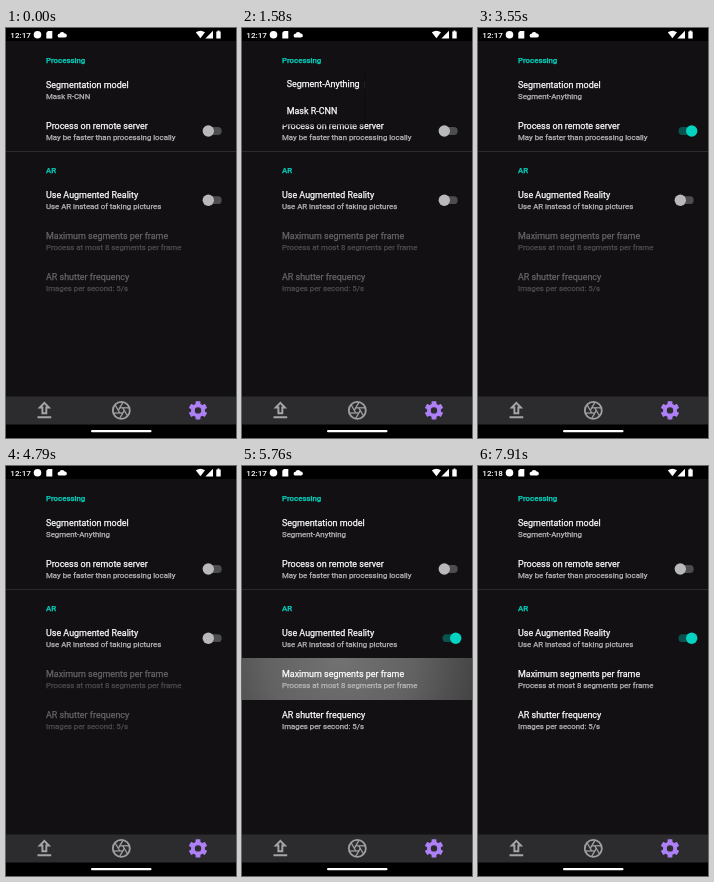
Recreate the animation shown at these times as an HTML page. Size 230 by 410 pixels, loop 8000 ms.

```html
<!DOCTYPE html>
<html lang="en">
<head>
<meta charset="utf-8">
<title>Settings</title>
<style>
html, body { margin: 0; width: 100%; height: 100%; overflow: hidden; background: #000; }
svg { display: block; width: 230px; height: 410px; font-family: Roboto, "Noto Sans", sans-serif; }
text { stroke-width: .25px; }
.head { font-size: 7.83px; font-weight: 500; fill: #04d1be; stroke: #04d1be; }
.title { font-size: 8.95px; fill: #fff; stroke: #fff; }
.sub { font-size: 7.83px; fill: #bababb; stroke: #bababb; }
</style>
</head>
<body>
<svg viewBox="0 0 230 410">
  <defs>
    <radialGradient id="glow" gradientUnits="userSpaceOnUse" cx="98" cy="0" r="135">
      <stop offset="0" stop-color="#727272"/>
      <stop offset=".55" stop-color="#626262"/>
      <stop offset="1" stop-color="#454545"/>
    </radialGradient>
  </defs>
  <rect width="230" height="410"/>
  <rect y="13" width="230" height="356" fill="#121013"/>

  <g fill="#fff">
    <text id="clock" x="4.3" y="9.8" font-size="8.1" font-weight="500"></text>
    <circle cx="31.5" cy="6.8" r="3.8"/>
    <path d="M42 3h4.3v7.6h-6V4.8z"/>
    <path d="M53.5 9.6a1.9 1.9 0 0 1 0-3.8 2.8 2.8 0 0 1 5.2-.2 2 2 0 0 1 .3 4z"/>
    <path d="M189.8 4.3q4.6-3 9.2 0l-4.6 6z"/>
    <path d="M207 2.8v7.6h-7.6z"/>
    <path d="M210.3 3.4h1.3v-.8h1.8v.8h1.3v7h-4.4z"/>
  </g>

  <rect id="ripple" width="230" height="42" fill="url(#glow)"/>
  <rect y="123" width="230" height="1" fill="#2b2a2c"/>
  <text class="head" x="40" y="35.3">Processing</text>
  <text class="head" x="40" y="145">AR</text>
  <g id="rows"></g>

  <rect y="368.5" width="230" height="28" fill="#2c2b2e"/>
  <path transform="translate(26.6 370.6) scale(.98)" fill="#a5a5a6" fill-rule="evenodd"
    d="M5 20h14v-2H5zM9 16h6v-6h4l-7-7-7 7h4zM11 14V8H9.8L12 5.8 14.2 8H13v6z"/>
  <g id="shutter" transform="translate(115.3 382.4)" fill="none" stroke="#a0a0a1" stroke-width="1.3">
    <circle r="8.5" stroke-width="1.8"/>
  </g>
  <g id="gear" transform="translate(192 382.4)" fill="#ae80f7">
    <circle r="5.1" fill="none" stroke="#ae80f7" stroke-width="3.8"/>
  </g>
  <rect x="85" y="402.1" width="60.5" height="2.2" rx="1.1" fill="#fff"/>
  <g id="menus"></g>
</svg>

<script>
const $ = id => document.getElementById(id);

function add(parent, tag, attrs, text = '') {
  const el = document.createElementNS('http://www.w3.org/2000/svg', tag);
  for (const key in attrs) el.setAttribute(key, attrs[key]);
  el.textContent = text;
  return parent.appendChild(el);
}

// Progress from 0 to 1 between two times
const ramp = (t, a, b) => Math.min(1, Math.max(0, (t - a) / (b - a)));
const ease = p => p * p * (3 - 2 * p);
// Rises over a..b, falls over c..d
const pulse = (t, a, b, c, d) => ramp(t, a, b) * (1 - ramp(t, c, d));
const mix = (from, to, p) =>
  `rgb(${from.map((v, i) => Math.round(v + (to[i] - v) * p))})`;

for (let a = 0; a < 360; a += 60) {
  add($('shutter'), 'path', { d: 'M-1.5 -2.6H8', transform: `rotate(${a})` });
  add($('gear'), 'rect', { x: -2.4, y: -9.2, width: 4.8, height: 3.6, rx: .6, transform: `rotate(${a})` });
}

const rows = [
  [60.2, 'Segmentation model', 'Mask R-CNN'],
  [101, 'Process on remote server', 'May be faster than processing locally'],
  [170.2, 'Use Augmented Reality', 'Use AR instead of taking pictures'],
  [211, 'Maximum segments per frame', 'Process at most 8 segments per frame'],
  [251.7, 'AR shutter frequency', 'Images per second: 5/s']
].map(([y, title, sub]) => {
  const g = add($('rows'), 'g', {});
  add(g, 'text', { class: 'title', x: 40, y }, title);
  return { g, y, sub: add(g, 'text', { class: 'sub', x: 40, y: y + 11 }, sub) };
});

function makeSwitch(y) {
  const track = add($('rows'), 'rect', { x: 200.5, y: y - 3.9, width: 15.2, height: 7.8, rx: 3.9 });
  const thumb = add($('rows'), 'circle', { cy: y, r: 5.7 });
  return p => {
    track.setAttribute('fill', mix([77, 76, 78], [10, 82, 77], p));
    thumb.setAttribute('fill', mix([185, 185, 185], [3, 211, 192], p));
    thumb.setAttribute('cx', 202.3 + 11.4 * p);
  };
}
const setRemote = makeSwitch(103);
const setAr = makeSwitch(172.2);

const STEP = 26.86;
function makeMenu(top, width, picked, items) {
  const g = add($('menus'), 'g', {});
  const height = STEP * items.length;
  add(g, 'rect', { x: 39.5, y: top + 1, width: width + 1, height: height + 1, fill: '#000', opacity: .3 });
  add(g, 'rect', { x: 39.5, y: top, width, height, fill: '#121013' });
  const mark = add(g, 'rect', { x: 39.5, y: top + STEP * picked, width, height: STEP, fill: '#555' });
  items.forEach((s, i) => add(g, 'text', { class: 'title', x: 44.7, y: top + STEP * (i + .5) + 2.9 }, s));
  return (alpha, press) => {
    g.setAttribute('opacity', alpha);
    mark.setAttribute('opacity', press);
  };
}
const setModels = makeMenu(42.6, 82.5, 0, ['Segment-Anything', 'Mask R-CNN']);
const setLimits = makeMenu(193, 88.5, 2,
  ['unlimited segments', ...[10, 8, 6, 4, 2].map(n => n + ' segments'), '1 segment']);

// Row index, then fade in and fade out times
const taps = [
  [0, 60, 200, 300, 520],
  [1, 2970, 3000, 3030, 3090],
  [1, 3759, 3760, 3785, 3790],
  [2, 4910, 4935, 4965, 5000],
  [3, 5759, 5760, 5789, 5790]
];

function draw(t) {
  $('clock').textContent = t < 7910 ? '12:17' : '12:18';
  rows[0].sub.textContent = t < 1700 ? 'Mask R-CNN' : 'Segment-Anything';

  const tap = taps.find(p => t >= p[1] && t < p[4]);
  $('ripple').setAttribute('opacity', tap ? pulse(t, ...tap.slice(1)) : 0);
  if (tap) $('ripple').setAttribute('transform', `translate(0 ${rows[tap[0]].y - 19})`);

  setRemote(ease(pulse(t, 3000, 3090, 3760, 3800)));
  const ar = ease(ramp(t, 4930, 5020));
  setAr(ar);
  rows[3].g.setAttribute('opacity', .35 + .65 * ar);
  rows[4].g.setAttribute('opacity', .35 + .65 * ar);

  setModels(pulse(t, 300, 420, 1700, 1800), ramp(t, 1640, 1690));
  setLimits(pulse(t, 5789, 5790, 7360, 7400), ramp(t, 7330, 7350));
}

function tick() {
  draw(performance.now() % 8000);
  requestAnimationFrame(tick);
}
tick();
</script>
</body>
</html>
```
